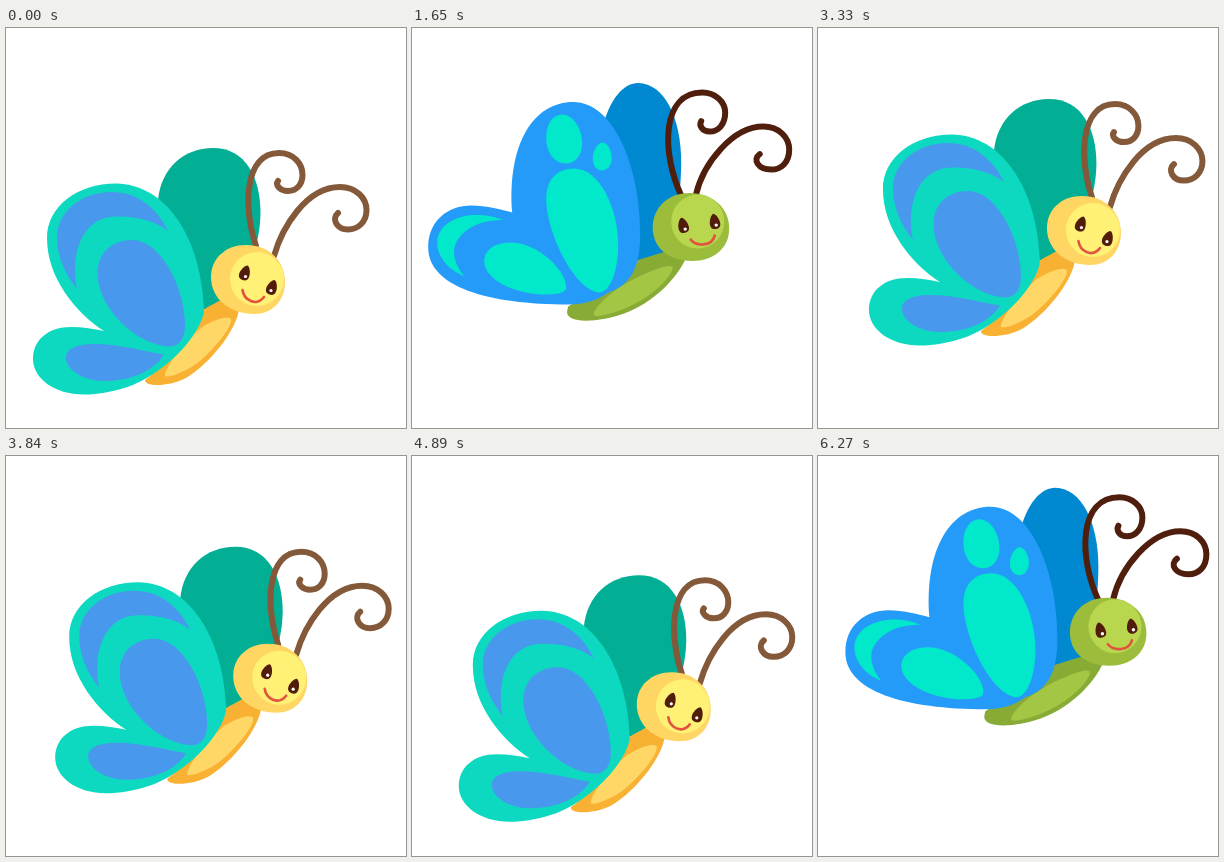
An HTML page that plays this animation: 400x400 px, repeating every 6300 ms.

```html
<!DOCTYPE html>
<html lang="en">
<head>
<meta charset="utf-8">
<title>Butterfly</title>
<style>
  html, body { margin: 0; width: 100%; height: 100%; overflow: hidden; background: #fff; }
  svg { display: block; width: 100%; height: 100%; }
  .antenna { fill: none; stroke-width: 6; stroke-linecap: round; }
  .smile { fill: none; stroke: #e2533f; stroke-width: 2.6; stroke-linecap: round; }
</style>
</head>
<body>
<svg viewBox="0 0 400 400">
  <defs>
    <path id="eye" fill="#521c0a" d="M0 -8 C3 -7 5.5 -1 5.2 3 C5 6 3 7.5 0 7.5 C-3 7.5 -5 6 -5.2 3 C-5.5 -1 -3 -7 0 -8Z"/>
  </defs>

  <g id="yellow">
    <path fill="#02af95" d="M152 172 C155 140 178 120 207 120 C240 120 254.5 150 254.5 185 C254 225 235 265 205 282 L190 280Z"/>
    <g class="antenna" stroke="#84593a">
      <path d="M250 218 C237 180 238 125 273 125 C288 125 296.5 136 296.5 147 C296.5 157 290 163 282 163 C274 163 269 157 272 153"/>
      <path d="M268 228 C276 200 300 159 334 159 C350 159 360.5 170 360.5 182 C360.5 194 352 201.5 342 201.5 C331 201.5 325 191 332 185"/>
    </g>
    <path fill="#f8b133" d="M139 352 C150 345 185 310 196 283 C203 277 214 274 222 267 L233 280 C232 300 205 335 180 350 C160 360 138 358 139 352Z"/>
    <path fill="#ffd766" d="M159 348 C158 340 180 312 195 300 C210 290 225 287 225 292 C226 300 205 325 190 336 C175 346 162 350 159 348Z"/>
    <path fill="#0dd9c0" d="M98 303 C70 285 41 250 41 210 C41 178 72 155.5 110 155.5 C160 156 196 210 198 283 C197 292 190 305 180 317 C165 335 140 354 118 360 C105 364 92 366.5 78 366.5 C48 366.5 27 350 27 331 C27 312 42 299 65 299 C77 299 88 301 98 303Z"/>
    <g fill="#4899ed">
      <path d="M162 203 C150 178 130 164 106 164 C74 164 51 185 51 209 C51 230 60 247 71 261 C64 225 76 189 110 188.5 C130 188 150 193 162 203Z"/>
      <path d="M126 212 C155 212 179 260 179 298 C179 312 172 318.5 163 318.5 C130 317 91.5 280 91.5 245 C91.5 225 106 212 126 212Z"/>
      <path d="M158 326.5 C140 324 115 316 88 316 C70 316 60 321 60 330 C60 342 78 353 98 353 C125 353 148 343 158 326.5Z"/>
    </g>
    <path fill="#ffd664" d="M240 217 C263 217 279 233 279 254 C279 273 266 286 248 286 C224 286 205 271 205 249 C205 230 220 217 240 217Z"/>
    <ellipse cx="251" cy="251" rx="27" ry="27" fill="#fff176"/>
    <use href="#eye" transform="translate(239 245) rotate(20)"/>
    <use href="#eye" transform="translate(266 259.5) rotate(20)"/>
    <circle cx="239.5" cy="248.5" r="1.6" fill="#fff"/>
    <circle cx="265" cy="262.5" r="1.6" fill="#fff"/>
    <path class="smile" d="M236.5 262 C238 272 250 279 258 269"/>
  </g>

  <g id="green">
    <path fill="#0088d1" d="M182 130 C190 95 205 80.5 219 80.5 C245 81 262 115 262 160 C262 200 252 243 244 258 L200 266Z"/>
    <g class="antenna" stroke="#4f1e0d">
      <path d="M262 193 C242 150 242 90 283 90 C296 90 306 99 306 110 C306 122 299 129 290.5 129 C283 129 279.5 123 282 118.5"/>
      <path d="M276.5 193 C284 160 314 124 344 124 C360 124 370 135 370 147 C370 160 362 167 352 167 C339 167 333 157 340.5 151.5"/>
    </g>
    <path fill="#88ab36" d="M149 304 C160 296 190 288 206 262 C222 256 238 252 255 246 L266 257 C258 275 235 300 205 311 C180 320 145 322 148 308Z"/>
    <path fill="#a3c645" d="M175 313 C172 308 190 290 210 279 C230 268 250 261 253 264 C256 269 240 288 220 299 C200 310 180 315 175 313Z"/>
    <path fill="#249bf9" d="M93 210 C88 140 115 99.5 154 99.5 C195 99.5 221 165 221 230 C221 262 214 282 188 290.5 C178 298 165 302 150 302 C68 302 9 284 9 245 C9 218 29 203 52 203 C68 203 82 207 93 210Z"/>
    <g fill="#02e8cb">
      <path d="M143 112 C154 112 163 126 163 141 C163 153 156 161 147 161 C135 161 127 150 127 135 C127 121 134 112 143 112Z"/>
      <path d="M184 140 C189 141 192.5 149 192.5 156 C192.5 163 188 168 183 168 C177 168 173.5 163 173.5 156 C173.5 148 179 139.5 184 140Z"/>
      <path d="M155 166 C180 166 199 205 199 243 C199 270 190 290 180 290 C155 288 127 230 127 196 C127 178 137 166 155 166Z"/>
      <path d="M92 240 C118 240 148 268 147 286 C146 292 130 292 122 292 C90 290 65 275 65 259 C65 247 76 240 92 240Z"/>
      <path d="M84 217.5 C70 212 60 212 53 212.5 C32 214 18 226 18 240 C18 255 30 268 45 273.5 C37 265 34 253 35 247 C37 232 55 217 84 217.5Z"/>
    </g>
    <path fill="#9bbd3b" d="M270 190.5 C293 190.5 310 205 310 226 C310 246 294 258.5 273 258.5 C249 258.5 233.5 245 233.5 225 C233.5 205 249 190.5 270 190.5Z"/>
    <ellipse cx="278.5" cy="219" rx="26.5" ry="27" fill="#b8d64e"/>
    <use href="#eye" transform="translate(264 223) rotate(-14)"/>
    <use href="#eye" transform="translate(295.5 219) rotate(-10)"/>
    <circle cx="266" cy="226.5" r="1.7" fill="#fff"/>
    <circle cx="297" cy="222.5" r="1.7" fill="#fff"/>
    <path class="smile" d="M271.5 237 C277 244 293 244 295.5 233"/>
  </g>
</svg>
<script>
  const LOOP = 6300, STEP = 30, SWAP = 480;
  // Flight path: [time, x, y], straight between the points
  const path = [
    [0, -1.5, 113.4], [930, 9, 80.5], [1950, 19.2, 44.5],
    [2410, 25.6, 29.2], [4770, 17.5, 119.8], [6300, 27.6, 30]
  ];
  // Path position at which each butterfly sits as drawn
  const butterflies = [
    { node: document.getElementById('yellow'), x: -1.5, y: 113.4 },
    { node: document.getElementById('green'), x: 9, y: 80.5 }
  ];

  function positionAt(t) {
    const i = path.findIndex(p => p[0] > t);
    const [t0, x0, y0] = path[i - 1], [t1, x1, y1] = path[i];
    const k = (t - t0) / (t1 - t0);
    return [x0 + (x1 - x0) * k, y0 + (y1 - y0) * k];
  }

  function render(time) {
    const t = Math.floor((time % LOOP) / STEP) * STEP;
    const [x, y] = positionAt(t);
    const visible = Math.floor(t / SWAP) % 2;
    butterflies.forEach((b, i) => {
      b.node.setAttribute('display', i === visible ? 'inline' : 'none');
      b.node.setAttribute('transform', `translate(${x - b.x} ${y - b.y})`);
    });
  }

  const start = performance.now();
  function tick() {
    render(performance.now() - start);
    requestAnimationFrame(tick);
  }
  tick();
</script>
</body>
</html>
```
